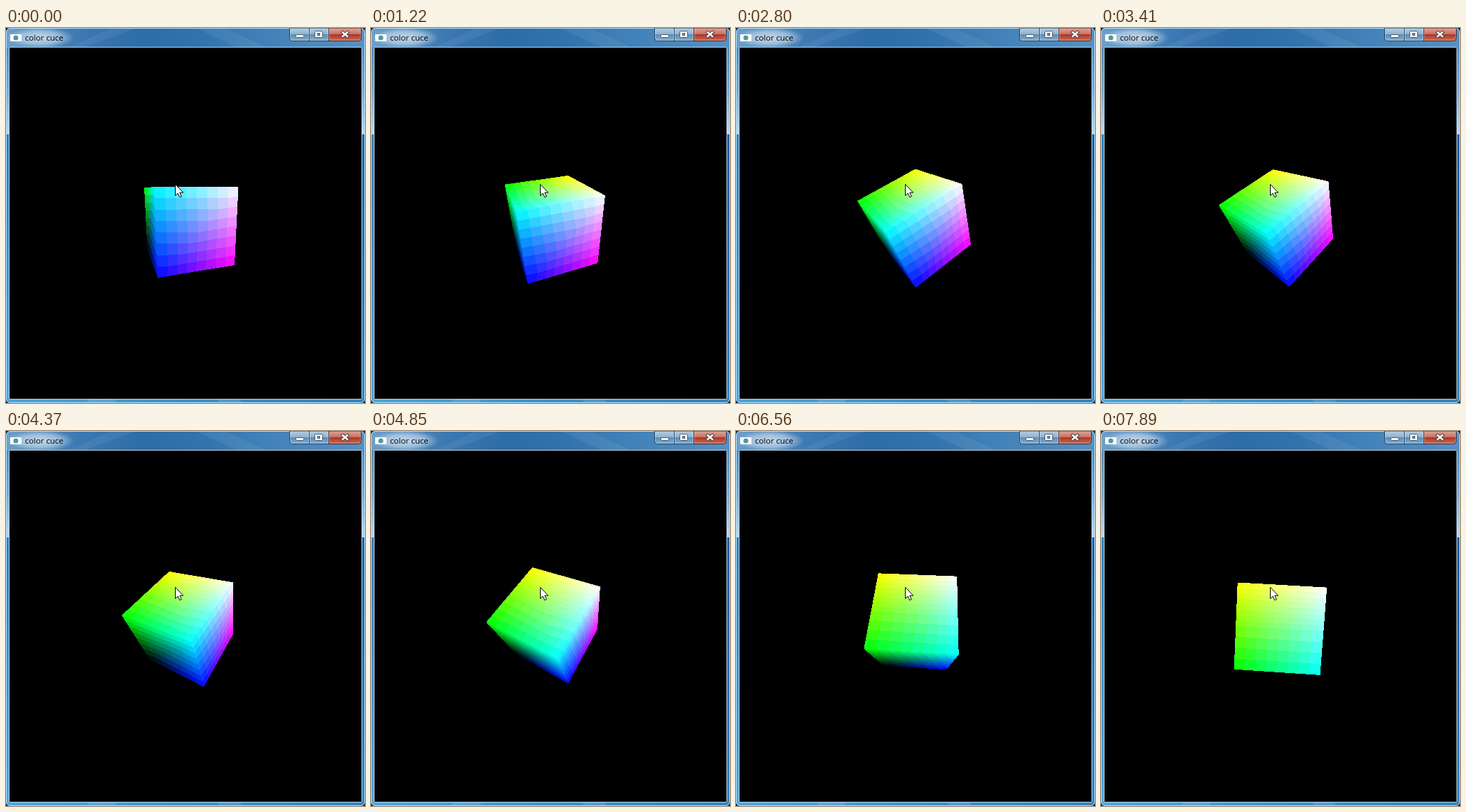
Write an HTML page with a canvas that moves like this. It is 512 by 536 pixels and loops after 8000 ms.

```html
<!DOCTYPE html>
<html lang="en">
<head>
<meta charset="utf-8">
<title>color cuce</title>
<style>
  html, body { margin: 0; width: 100%; height: 100%; overflow: hidden; background: #000; }
  .window { position: absolute; left: 0; top: 0; width: 512px; height: 536px; overflow: hidden; }
  svg, canvas { position: absolute; display: block; }
  svg { left: 0; top: 0; }
  canvas { left: 5px; top: 28px; }
  text { font: 11.6px "Open Sans", "Noto Sans", sans-serif; fill: #000; }
</style>
</head>
<body>
<div class="window">
  <svg width="512" height="536" viewBox="0 0 512 536">
    <defs>
      <linearGradient id="bar">
        <stop offset="0" stop-color="#6d9fca"/>
        <stop offset=".2" stop-color="#3d79b2"/>
        <stop offset=".38" stop-color="#2d6ca7"/>
        <stop offset=".55" stop-color="#3273ad"/>
        <stop offset=".7" stop-color="#4080b7"/>
        <stop offset="1" stop-color="#5790c2"/>
      </linearGradient>
      <linearGradient id="side" x2="0" y2="1">
        <stop offset="0" stop-color="#4f8cc0"/>
        <stop offset=".5" stop-color="#78a9d2"/>
        <stop offset="1" stop-color="#bfd8ec"/>
      </linearGradient>
      <linearGradient id="left" x2="0" y2="1">
        <stop offset="0" stop-color="#2f7fbe"/>
        <stop offset="1" stop-color="#4ea6dc"/>
      </linearGradient>
      <linearGradient id="right" x2="0" y2="1">
        <stop offset="0" stop-color="#1c5c9c"/>
        <stop offset="1" stop-color="#3583bd"/>
      </linearGradient>
      <linearGradient id="foot">
        <stop offset="0" stop-color="#4ea6dc"/>
        <stop offset=".5" stop-color="#3b92cc"/>
        <stop offset="1" stop-color="#3583bd"/>
      </linearGradient>
      <linearGradient id="glass" x2="0" y2="1">
        <stop offset="0" stop-color="#b5cfe4"/>
        <stop offset=".48" stop-color="#8eb2d0"/>
        <stop offset=".5" stop-color="#5d8bb2"/>
        <stop offset="1" stop-color="#84b0d3"/>
      </linearGradient>
      <linearGradient id="red" x2="0" y2="1">
        <stop offset="0" stop-color="#dda79c"/>
        <stop offset=".48" stop-color="#c8705f"/>
        <stop offset=".5" stop-color="#ab3422"/>
        <stop offset="1" stop-color="#c9705b"/>
      </linearGradient>
      <radialGradient id="glow">
        <stop offset="0" stop-color="#e3eef8" stop-opacity=".8"/>
        <stop offset=".6" stop-color="#d3e4f2" stop-opacity=".55"/>
        <stop offset="1" stop-color="#c3d9ec" stop-opacity="0"/>
      </radialGradient>
    </defs>
    <rect width="512" height="536" fill="#14202b"/>
    <clipPath id="shape"><rect width="512" height="536" rx="6"/></clipPath>
    <g clip-path="url(#shape)">
      <rect width="512" height="28" fill="url(#bar)"/>
      <path d="M90 28L150 0H186L110 28ZM270 0H312L372 28H330Z" fill="#fff" opacity=".06"/>
      <rect y="28" width="6" height="124" fill="url(#side)"/>
      <rect x="506" y="28" width="6" height="124" fill="url(#side)"/>
      <rect y="152" width="6" height="384" fill="url(#left)"/>
      <rect x="506" y="152" width="6" height="384" fill="url(#right)"/>
      <rect y="530" width="512" height="6" fill="url(#foot)"/>
      <path d="M120 530h40l-8 6h-40zM300 530h30l9 6h-34z" fill="#fff" opacity=".12"/>
      <ellipse cx="49" cy="14" rx="48" ry="15" fill="url(#glow)"/>
    </g>
    <rect x=".5" y=".5" width="511" height="535" rx="6" fill="none" stroke="#b4dcf1"/>
    <rect x="4.5" y="27.5" width="503" height="503" rx="1" fill="none" stroke="#b9d7ec"/>

    <rect x="6" y="9" width="16" height="10" fill="#fff"/>
    <circle cx="14" cy="14" r="3.5" fill="#4d9a9c"/>
    <text x="27" y="18">color cuce</text>

    <g stroke="#24405a">
      <path d="M404.5 0V14.5Q404.5 18.5 408.5 18.5H432.5V0Z" fill="url(#glass)"/>
      <path d="M432.5 0V18.5H460.5V0Z" fill="url(#glass)"/>
      <path d="M460.5 0V18.5H502.5Q506.5 18.5 506.5 14.5V0Z" fill="url(#red)" stroke="#4b1d1b"/>
    </g>
    <path d="M405.5 1V14Q405.5 17.5 409 17.5H431.5V1M433.5 1V17.5H459.5V1M461.5 1V17.5H502Q505.5 17.5 505.5 14V1" fill="none" stroke="#fff" opacity=".35"/>
    <rect x="413.5" y="9.5" width="11" height="4" rx="1" fill="#fff" stroke="#46586a"/>
    <rect x="440.5" y="4.5" width="11" height="9" rx="1" fill="#fff" stroke="#46586a"/>
    <rect x="444.5" y="7.5" width="3" height="3" fill="#7ea6c6" stroke="#46586a"/>
    <g fill="none" stroke-linecap="square">
      <path d="M480 6L487 12M487 6L480 12" stroke="#53383b" stroke-width="4.4"/>
      <path d="M480 6L487 12M487 6L480 12" stroke="#fff" stroke-width="2.4"/>
    </g>
  </svg>
  <canvas id="view" width="502" height="502"></canvas>
  <svg width="512" height="536" viewBox="0 0 512 536">
    <path d="M241.5 223.5V239.5L245.2 236.2L247.8 241.8L250.3 240.7L247.8 235.2H252.7Z" fill="#fff" stroke="#000"/>
  </svg>
</div>
<script>
const LOOP = 8000, TICK = 120, SIZE = 502, EYE = 5;

// bursts of rotation steps: [start ms, steps]
const bursts = [
  [120, 6], [1220, 2], [1590, 6], [2440, 5], [3170, 7], [4010, 7],
  [4850, 3], [5340, 2], [5710, 6], [6560, 1], [6810, 7], [7650, 3]
];

// [step, x, y, z] in degrees
const poses = [
  [0, 10.8, 18.7, 0.4],
  [6, 28.4, 19, 0.4],
  [8, 28.4, 19.4, 5.4],
  [13, 28.3, 20.2, 18],
  [14, 28.2, 20.4, 19.8],
  [22, 27.6, 42.7, 19.6],
  [26, 28.8, 49, 19.8],
  [30, 30.4, 55.9, 19.9],
  [33, 38.5, 56.2, 20.1],
  [35, 44.3, 57, 20.5],
  [38, 44.8, 65.8, 21.2],
  [45, 44.4, 85.5, 23],
  [55, 70.7, 86.3, 23.5]
];

// each corner's colour is also its place in the cube
const corners = "000 100 110 010 001 101 111 011".split(" ").map(s => [...s].map(Number));
const faces = ["0321", "2376", "0473", "1265", "4567", "0154"];

const ctx = document.getElementById("view").getContext("2d");
const image = ctx.createImageData(SIZE, SIZE);
const pixels = new Uint32Array(image.data.buffer);
const BLACK = 0xff000000;

function stepAt(time) {
  let n = 0;
  for (const [start, count] of bursts) {
    n += Math.max(0, Math.min(count, Math.floor((time - start) / TICK) + 1));
  }
  return n;
}

function anglesAt(step) {
  let i = 0;
  while (i < poses.length - 2 && poses[i + 1][0] <= step) i++;
  const a = poses[i], b = poses[i + 1];
  const k = (step - a[0]) / (b[0] - a[0]);
  return [1, 2, 3].map(j => (a[j] + (b[j] - a[j]) * k) * Math.PI / 180);
}

function turn(a, b, angle) {
  const c = Math.cos(angle), s = Math.sin(angle);
  return [a * c - b * s, a * s + b * c];
}

function project(corner, [ax, ay, az]) {
  let [x, y, z] = corner.map(v => v * 2 - 1);
  [x, y] = turn(x, y, az);
  [z, x] = turn(z, x, ay);
  [y, z] = turn(y, z, ax);
  const scale = SIZE / 2 / (EYE - z);
  return { x: SIZE / 2 + x * scale, y: SIZE / 2 - y * scale, color: corner };
}

// the middle of the band that holds v; full and empty channels stay pure
function band(v, levels) {
  if (v < 1e-6) return 0;
  if (v > 1 - 1e-6) return 255;
  return Math.round((Math.floor(v * levels) + 0.5) * 255 / levels);
}

function shade(rgb) {
  const fine = rgb[1] > 1 - 1e-6 && rgb[0] >= 0.5;
  const [r, g, b] = rgb.map(v => band(v, fine ? 16 : 8));
  return BLACK | b << 16 | g << 8 | r;
}

function cross(a, b, x, y) {
  return (b.x - a.x) * (y - a.y) - (b.y - a.y) * (x - a.x);
}

// colours run linearly across the screen within each triangle
function fillTriangle(a, b, c) {
  const area = cross(a, b, c.x, c.y);
  if (area >= 0) return;
  const xs = [a.x, b.x, c.x], ys = [a.y, b.y, c.y];
  const x0 = Math.floor(Math.min(...xs)), x1 = Math.ceil(Math.max(...xs));
  const y0 = Math.floor(Math.min(...ys)), y1 = Math.ceil(Math.max(...ys));
  for (let y = y0; y < y1; y++) {
    for (let x = x0; x < x1; x++) {
      const wa = cross(b, c, x + 0.5, y + 0.5) / area;
      const wb = cross(c, a, x + 0.5, y + 0.5) / area;
      const wc = 1 - wa - wb;
      if (wa < 0 || wb < 0 || wc < 0) continue;
      pixels[y * SIZE + x] = shade([0, 1, 2].map(i =>
        wa * a.color[i] + wb * b.color[i] + wc * c.color[i]));
    }
  }
}

function drawCube(step) {
  const angles = anglesAt(step);
  const points = corners.map(c => project(c, angles));
  pixels.fill(BLACK);
  for (const face of faces) {
    const [a, b, c, d] = [...face].map(i => points[i]);
    fillTriangle(a, b, c);
    fillTriangle(a, c, d);
  }
  ctx.putImageData(image, 0, 0);
}

let shown = -1;
function frame() {
  const step = stepAt(performance.now() % LOOP);
  if (step !== shown) drawCube(shown = step);
  requestAnimationFrame(frame);
}
frame();
</script>
</body>
</html>
```
